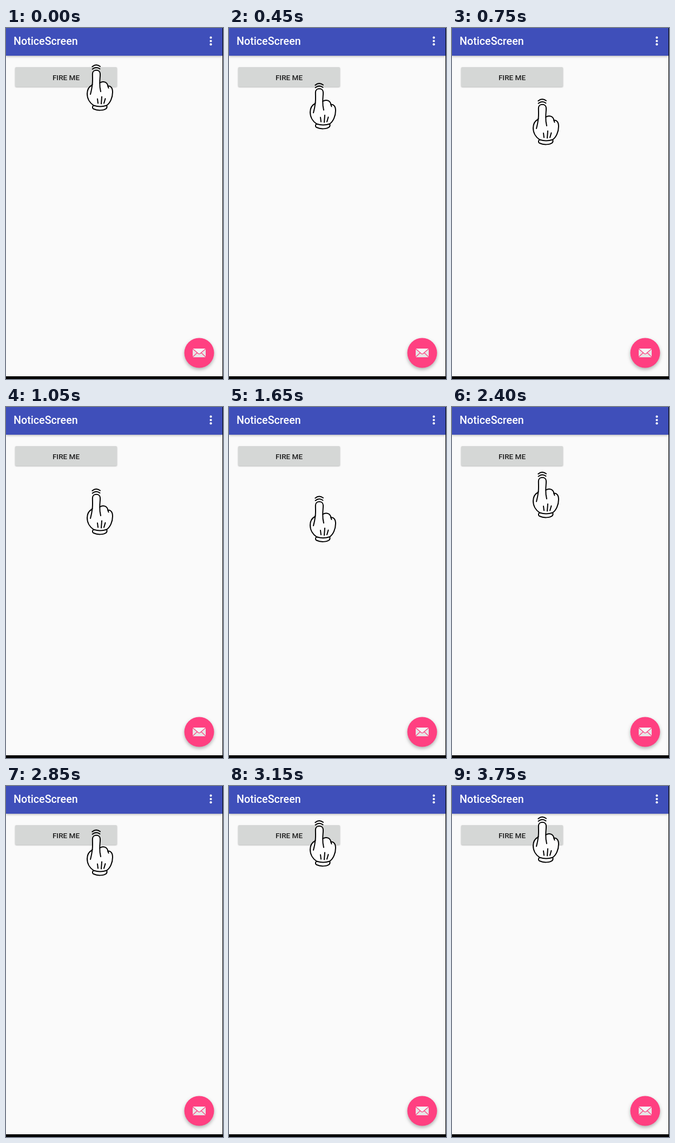
Recreate the animation shown at these times as an HTML page. Size 401 by 646 pixels, loop 3.85 s.

```html
<!DOCTYPE html>
<html lang="en">
<head>
<meta charset="utf-8">
<title>Tap demo</title>
<style>
  html, body { margin: 0; width: 100%; height: 100%; overflow: hidden; background: #000; }
  svg { display: block; width: 401px; height: 646px; }
  text { font-family: Roboto, sans-serif; font-weight: 500; }
  .bar { filter: drop-shadow(0 1px 2px rgba(0, 0, 0, .32)); }
  .button { filter: drop-shadow(0 1px 1px rgba(0, 0, 0, .28)); }
  .fab { filter: drop-shadow(0 3px 3px rgba(0, 0, 0, .3)); }
  .hand { stroke: #000; stroke-width: 2; stroke-linecap: round; stroke-linejoin: round; fill: none; }
  .skin { fill: #fdfdfd; }
</style>
</head>
<body>
<svg viewBox="0 0 401 646">
  <rect width="400" height="641" fill="#fafafa"/>

  <rect class="bar" width="400" height="51" fill="#3f4fba"/>
  <text x="14" y="31" font-size="19.7" fill="#fff">NoticeScreen</text>
  <g fill="#fff">
    <circle cx="378.5" cy="17.7" r="2.1"/>
    <circle cx="378.5" cy="24" r="2.1"/>
    <circle cx="378.5" cy="30.2" r="2.1"/>
  </g>

  <rect class="button" x="17" y="72" width="188" height="36" rx="2" fill="#d5d7d6"/>
  <text x="111" y="95.5" font-size="13.5" text-anchor="middle" fill="#1c1c1c">FIRE ME</text>

  <circle class="fab" cx="357" cy="598" r="27.5" fill="#ff4081"/>
  <rect x="345" y="590" width="24" height="16" rx="1" fill="#e6e6e6"/>
  <path d="M346 590H368L357 599Z" fill="#f6f6f6"/>
  <path d="M345 590.5L355.5 599.5Q357 600.5 358.5 599.5L369 590.5M345 605.5L353 598M369 605.5L361 598"
        fill="none" stroke="#ff4081" stroke-width="1.2"/>

  <g id="hand" class="hand">
    <path d="M10.3 4.2Q17.5-2 25 3.8M10.6 8.7Q17.5 3 24.5 8.2"/>
    <path class="skin" d="M12 76C10 79 11 81 13 82C20 85.5 31 85 36 81.500Q38.500 79 37 75Z"/>
    <path class="skin" d="M10.500 37C11.500 30 10.700 22 10.900 17C11.300 8.500 24.500 8.500 25 17
      C25.300 23 24 28 24.300 34C31 29.500 38.500 33 39.300 40C44 39 48 43 48 51
      C48 61 43.500 71 37 75.500Q25 79.500 13 75.500C6 71 1 63 1 54C1 47 4.500 41 10 38Z"/>
    <path d="M10.500 37Q9.500 46 7 55M24.300 34Q24 42 26 50M39.300 40L40.500 43.500"/>
    <path d="M20 63.500L21 71.500M28 59.500L27 72.500M34.500 63L32 71.500"/>
  </g>
</svg>
<script>
  const LOOP = 3850, STEP = 150;
  // Height of the fingertip at each step of the hand-guided swipe.
  const tops = [67, 77, 90, 101, 117, 130, 142, 150, 159, 162, 164.5, 163.5, 160,
                151, 142, 133, 119, 104, 96, 80, 70, 63, 57, 53, 53, 56];
  const hand = document.getElementById('hand');

  function draw(now) {
    const step = Math.floor((now % LOOP) / STEP);
    hand.setAttribute('transform', `translate(149 ${tops[step]})`);
    requestAnimationFrame(draw);
  }
  draw(performance.now());
</script>
</body>
</html>
```
